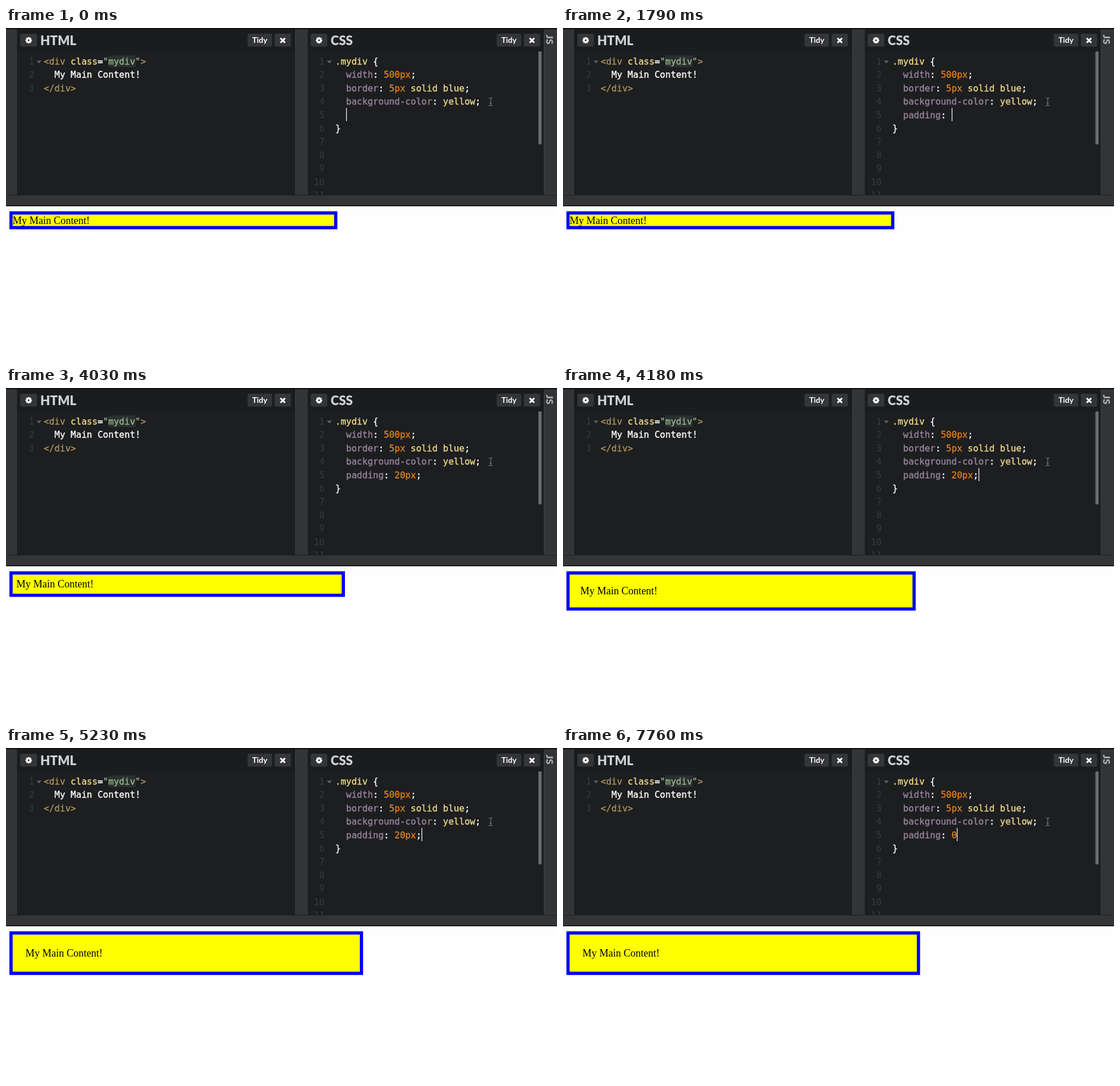
Animation of 964 by 581 pixels, one loop 8000 ms. Source, as an HTML page with a canvas:

```html
<!DOCTYPE html>
<html lang="en">
<head>
<meta charset="utf-8">
<title>Padding demo</title>
<style>
  html, body { margin: 0; width: 100%; height: 100%; overflow: hidden; background: #fff; }
  canvas { display: block; width: 964px; height: 581px; }
</style>
</head>
<body>
<canvas id="stage" width="964" height="581"></canvas>
<script>
const ctx = document.getElementById('stage').getContext('2d');
const LOOP = 8000;
const MONO = '15.65px "DejaVu Sans Mono", monospace';
const LINE = 23.4, BASE = 64;
const C = {
  bg: '#1d1e20', bar: '#333436', button: '#343537', white: '#fff', num: '#38393b',
  tag: '#a7925a', attr: '#ecd985', str: '#96b38a', prop: '#9b859d', val: '#de821c', title: '#cfd0d1'
};

// [start, text on the edited line, caret visible]
const STEPS = [
  [0, '', 1], [450, 'p', 1], [600, 'po', 1], [750, 'p', 1],
  [1050, 'pa', 1], [1200, 'pad', 1], [1350, 'padd', 1], [1500, 'paddin', 1],
  [1650, 'padding:', 1], [1790, 'padding: ', 1],
  [2390, 'padding: 2', 1], [2540, 'padding: 20', 1], [2690, 'padding: 20p', 1],
  [2840, 'padding: 20px', 1], [2990, 'padding: 20px;', 1],
  [3590, 'padding: 20px;', 0], [4180, 'padding: 20px;', 1], [4780, 'padding: 20px;', 0],
  [5230, 'padding: 20px;', 1], [5680, 'padding: 20px;', 0], [6270, 'padding: 20px;', 1],
  [6720, 'padding: 20px;', 0],
  [7020, 'padding: 20px', 1], [7170, 'padding: 20p', 1], [7320, 'padding: 20', 1],
  [7470, 'padding: 2', 1], [7620, 'padding: ', 1], [7760, 'padding: 0', 1]
];

function rect(x, y, w, h, color, r = 0) {
  ctx.fillStyle = color;
  ctx.beginPath();
  ctx.roundRect(x, y, w, h, r);
  ctx.fill();
}

function text(str, x, y, font, color, align = 'left') {
  ctx.font = font;
  ctx.fillStyle = color;
  ctx.textAlign = align;
  ctx.fillText(str, x, y);
}

// Draws [text, color] pairs one after another, slightly emboldened, and returns the end position.
function code(x, line, ...parts) {
  const y = BASE + (line - 1) * LINE;
  ctx.lineWidth = 0.35;
  for (const [str, color] of parts) {
    text(str, x, y, MONO, color);
    ctx.strokeStyle = color;
    ctx.strokeText(str, x, y);
    x += ctx.measureText(str).width;
  }
  return x;
}

function gear(x, y) {
  ctx.save();
  ctx.translate(x, y);
  for (let i = 0; i < 8; i++) {
    rect(-1.3, -5.6, 2.6, 4, C.white);
    ctx.rotate(Math.PI / 4);
  }
  ctx.strokeStyle = C.white;
  ctx.lineWidth = 2.6;
  ctx.beginPath();
  ctx.arc(0, 0, 3.1, 0, Math.PI * 2);
  ctx.stroke();
  ctx.restore();
}

function cross(x, y) {
  ctx.strokeStyle = C.white;
  ctx.lineWidth = 3;
  ctx.beginPath();
  for (const s of [-1, 1]) {
    ctx.moveTo(x - 4, y - 4 * s);
    ctx.lineTo(x + 4, y + 4 * s);
  }
  ctx.stroke();
}

function panel(x, right, title, lines, numX) {
  rect(x, 2, right - x, 290, C.bg);
  rect(x, 2, right - x, 39, '#1b1c1e');
  rect(x + 6, 10, 29, 22.5, C.button, 3);
  gear(x + 20.7, 21.5);
  text(title, x + 41, 30, '900 22px Lato, sans-serif', C.title);
  rect(right - 83.5, 10, 43, 22.5, C.button, 3);
  text('Tidy', right - 62, 26, 'bold 13.7px Lato, sans-serif', C.white, 'center');
  rect(right - 36, 10, 28.5, 22.5, C.button, 3);
  cross(right - 21.8, 21.8);
  for (let i = 1; i <= lines; i++) {
    text(i, numX, BASE + (i - 1) * LINE, MONO, C.num, 'right');
  }
  ctx.fillStyle = '#5b5c5e';
  ctx.beginPath();
  ctx.moveTo(numX + 4, 57);
  ctx.lineTo(numX + 13, 57);
  ctx.lineTo(numX + 8.5, 62);
  ctx.fill();
}

function strip(x, w) {
  rect(x, 2, w, 290, C.bar);
  rect(x, 2, 1, 290, '#3f4042');
  rect(x + w - 1, 2, 1, 290, '#3a3b3d');
}

function ibeam(x, y) {
  ctx.strokeStyle = '#77787a';
  ctx.lineWidth = 1.2;
  ctx.beginPath();
  for (const s of [-1, 1]) {
    ctx.moveTo(x - 3.5, y + 7 * s);
    ctx.quadraticCurveTo(x, y + 7 * s, x, y + 4.5 * s);
    ctx.quadraticCurveTo(x, y + 7 * s, x + 3.5, y + 7 * s);
  }
  ctx.moveTo(x, y - 5);
  ctx.lineTo(x, y + 5);
  ctx.moveTo(x - 2, y + 2.5);
  ctx.lineTo(x + 2, y + 2.5);
  ctx.stroke();
}

function htmlCode() {
  rect(179, 48, 48, 20.5, '#2a2f2f');
  code(66, 1, ['<div ', C.tag], ['class', C.attr], ['=', C.white], ['"mydiv"', C.str], ['>', C.tag]);
  code(66, 2, ['  My Main Content!', C.white]);
  code(66, 3, ['</div>', C.tag]);
}

function cssCode(t) {
  const x = 576.2, w = C.white;
  code(x, 1, ['.mydiv', C.attr], [' {', w]);
  code(x, 2, ['  width', C.prop], [': ', w], ['500px', C.val], [';', w]);
  code(x, 3, ['  border', C.prop], [': ', w], ['5px', C.val], [' solid blue', C.attr], [';', w]);
  code(x, 4, ['  background-color', C.prop], [': ', w], ['yellow', C.attr], [';', w]);
  const [, typed, caret] = STEPS.findLast(s => s[0] <= t);
  const [, name, colon, value, semi] = typed.match(/^(\w*)(:? ?)(\w*)(;?)$/);
  const end = code(x, 5, ['  ' + name, C.prop], [colon, w], [value, C.val], [semi, w]);
  code(x, 6, ['}', w]);
  if (caret) rect(Math.round(end), 140, 1.2, 23, w);
}

function editors(t) {
  rect(0, 0, 964, 312, '#121113');
  panel(19, 506, 'HTML', 3, 49.3);
  panel(527, 942, 'CSS', 11, 557.3);
  htmlCode();
  cssCode(t);
  rect(931.5, 41, 5.5, 162.5, '#6c6d6f', 1);
  ibeam(848, 129);
  strip(-1, 20);
  strip(506, 21.5);
  strip(941, 24);
  ctx.save();
  ctx.translate(944.5, 11.5);
  ctx.rotate(Math.PI / 2);
  text('JS', 0, 0, '900 17.5px Lato, sans-serif', '#aaabac');
  ctx.restore();
  rect(0, 292, 964, 18.5, C.bar);
  rect(0, 292, 964, 1, '#202123');
}

// The standard CSS "ease" curve.
function ease(p) {
  if (p <= 0) return 0;
  if (p >= 1) return 1;
  const bez = (a, b, u) => 3 * a * u * (1 - u) ** 2 + 3 * b * u * u * (1 - u) + u ** 3;
  let lo = 0, hi = 1;
  for (let i = 0; i < 24; i++) {
    const mid = (lo + hi) / 2;
    if (bez(0.25, 0.25, mid) < p) lo = mid; else hi = mid;
  }
  return bez(0.1, 1, lo);
}

function preview(t) {
  rect(0, 312, 964, 269, '#fefefe');
  const tick = 4030 + Math.floor((t - 4030) / 150) * 150;
  const pad = 22.5 * ease((tick - 3939) / 455);
  const x = 6, y = 320.8, b = 5.6;
  const w = 573.7 + 2 * pad, h = 31.4 + 2 * pad;
  rect(x, y, w, h, '#0000ff');
  rect(x + b, y + b, w - 2 * b, h - 2 * b, '#ffff00');
  text('My Main Content!', x + b + pad, 342.5 + pad, '18px "Liberation Serif", serif', '#000');
}

function draw(now) {
  const t = now % LOOP;
  editors(t);
  preview(t);
}

const start = performance.now();
function frame() {
  draw(performance.now() - start);
  requestAnimationFrame(frame);
}
frame();
</script>
</body>
</html>
```
